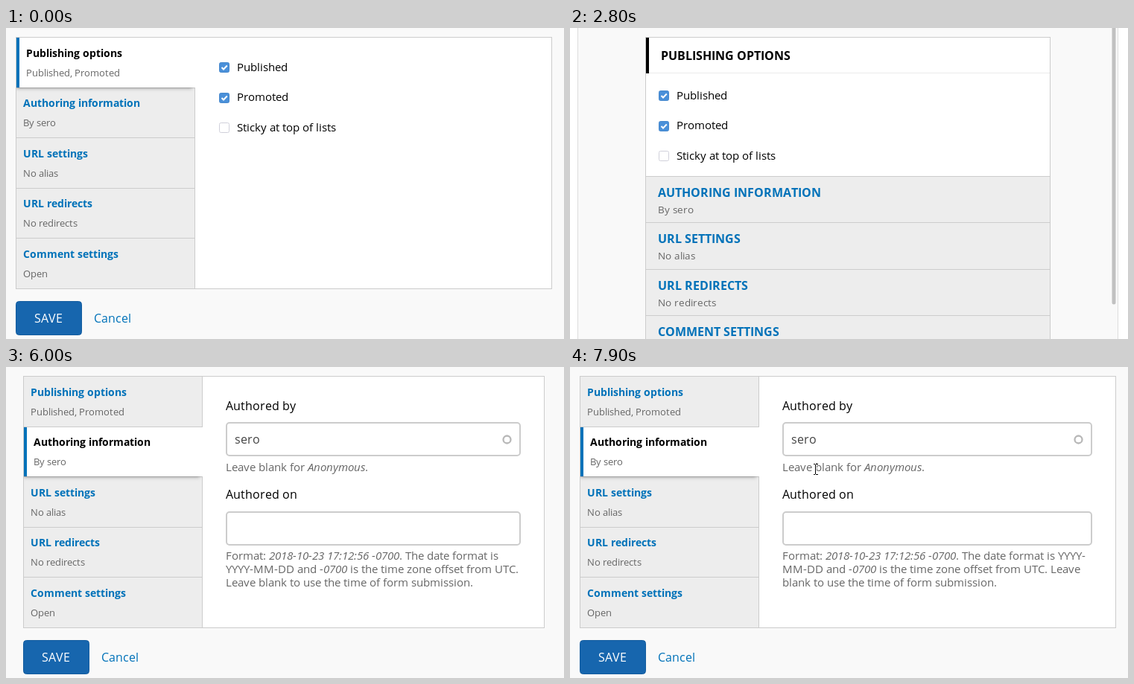
An HTML page with a canvas for the animation above (8000 ms loop, 749 by 418 pixels).

```html
<!DOCTYPE html>
<html lang="en">
<head>
<meta charset="utf-8">
<title>Responsive settings tabs</title>
<style>
html, body { margin: 0; width: 100%; height: 100%; overflow: hidden; background: #f9f9f9; }
canvas { display: block; }
</style>
</head>
<body>
<canvas id="stage" width="749" height="418"></canvas>
<script>
const W = 749, H = 418, LOOP = 8000;
const ctx = document.getElementById('stage').getContext('2d');

const BLUE = '#0072b9', LINE = '#ccc', TAB = '#ededed', PAGE = '#f9f9f9', MUTED = '#666';
const USER = 'sero';
const TABS = [
  ['Publishing options', 'Published, Promoted'],
  ['Authoring information', 'By ' + USER],
  ['URL settings', 'No alias'],
  ['URL redirects', 'No redirects'],
  ['Comment settings', 'Open']
];
const OPTIONS = ['Published', 'Promoted', 'Sticky at top of lists'];
const HELP_BY = 'Leave blank for *Anonymous*.';
const HELP_ON = 'Format: *2018-10-23 17:12:56 -0700*. The date format is YYYY-MM-DD and ' +
  '*-0700* is the time zone offset from UTC. Leave blank to use the time of form submission.';

// Window width over time: [ms, left, right] for the wide panel, [ms, edge] for the narrow window
const SIZES = [
  [0, 13, 733], [700, 12, 735], [900, 13, 733], [1100, 15, 731], [1200, 17, 729], [1300, 20, 726],
  [1400, 3], [1500, 5], [1600, 7], [1700, 9], [1800, 11], [2800, 10],
  [5700, 8], [5800, 6], [5900, 4],
  [6000, 23, 723], [6100, 22, 724], [6200, 21, 725], [6300, 18, 728], [6400, 15, 731],
  [6500, 12, 732], [6600, 13, 733]
];
const POINTER = [
  [0], [3200, hand, 591, 366], [3300, hand, 548, 337], [3400, hand, 503, 305],
  [3500, hand, 460, 274], [3600, hand, 430, 253], [3700, hand, 418, 245],
  [4000, arrow, 418, 245], [4400, arrow, 417, 244], [4600, arrow, 472, 286],
  [4700, arrow, 677, 404], [4800],
  [7600, arrow, 651, 404], [7700, arrow, 505, 272], [7800, arrow, 360, 160], [7900, beam, 330, 137]
];

const at = (keys, t) => keys.filter(k => k[0] <= t).pop();

function box(x, y, w, h, color) {
  ctx.fillStyle = color;
  ctx.fillRect(x, y, w, h);
}

function rounded(x, y, w, h, r, fill, stroke, lw = 1) {
  ctx.beginPath();
  ctx.roundRect(x + lw / 2, y + lw / 2, w - lw, h - lw, r);
  ctx.fillStyle = fill;
  ctx.fill();
  if (stroke) {
    ctx.strokeStyle = stroke;
    ctx.lineWidth = lw;
    ctx.stroke();
  }
}

// Text is set on whole pixels, with each advance rounded
const advances = new Map();
function advance(ch) {
  const key = ctx.font + ch;
  if (!advances.has(key)) advances.set(key, Math.round(ctx.measureText(ch).width));
  return advances.get(key);
}
const setFont = (size, style = '') => { ctx.font = `${style} ${size}px "Open Sans", sans-serif`; };
const measure = str => [...str].reduce((sum, ch) => sum + advance(ch), 0);

function glyphs(str, x, y) {
  for (const ch of str) {
    ctx.fillText(ch, x, y);
    x += advance(ch);
  }
  return x;
}

function text(str, x, y, size, color = '#000', style = '') {
  setFont(size, style);
  ctx.fillStyle = color;
  glyphs(str, x, y);
}

// Wrapped text; asterisks switch italics
function rich(str, left, y, width) {
  let x = left, italic = false;
  ctx.fillStyle = MUTED;
  for (const part of str.split(/(\*)|(?<= )|(?<=YYYY-|MM-)/).filter(Boolean)) {
    if (part === '*') {
      italic = !italic;
      continue;
    }
    setFont(15, italic ? 'italic' : '');
    if (x + measure(part.trimEnd()) > left + width) {
      x = left;
      y += 18.4;
    }
    x = glyphs(part, x, Math.floor(y));
  }
}

function checkbox(x, y, on) {
  rounded(x, y, 14, 14, 2, on ? '#4a90d9' : '#fff', on ? '#4688cd' : '#d0d0da');
  if (!on) return;
  ctx.strokeStyle = '#fff';
  ctx.lineWidth = 2;
  ctx.beginPath();
  ctx.moveTo(x + 3.5, y + 7);
  ctx.lineTo(x + 6, y + 9.5);
  ctx.lineTo(x + 10.8, y + 4.5);
  ctx.stroke();
}

function options(x, y) {
  OPTIONS.forEach((label, i) => {
    const top = y + Math.round(i * 40.5);
    checkbox(x, top, i < 2);
    text(label, x + 24, y + 12 + Math.floor(i * 40.5), 15);
  });
}

function authoring(x, y, width, gap) {
  text('Authored by', x, y, 16);
  rounded(x, y + 16, width, 46, 4, '#fff', LINE, 2);
  text(USER, x + 12, y + 45, 16, '#444');
  ctx.beginPath();
  ctx.arc(x + width - 18.5, y + 39.5, 5, 0, 7);
  ctx.strokeStyle = '#b8b8b8';
  ctx.lineWidth = 2.3;
  ctx.stroke();
  rich(HELP_BY, x, y + 82, width);
  text('Authored on', x, y + gap, 16);
  rounded(x, y + 136, width, 46, 4, '#fff', LINE, 2);
  rich(HELP_ON, x, y + gap + 82, width);
}

function wide(left, right, active) {
  box(0, 0, W, H, PAGE);
  box(left, 12, right - left, 339, LINE);
  box(left + 1, 13, right - left - 2, 337, '#fff');
  box(left + 1, 13, 239, 337, TAB);
  box(left + 240, 13, 1, 337, LINE);
  const edge = i => 12 + Math.floor(i * 67.6 + .4);
  for (let i = 1; i < 5; i++) box(left + 1, edge(i), 240, 1, LINE);

  const top = edge(active) + 1, bottom = edge(active + 1);
  ctx.save();
  ctx.beginPath();
  ctx.rect(left + 1, top, 240, bottom - top + 8);
  ctx.clip();
  ctx.shadowColor = 'rgba(0,0,0,.35)';
  ctx.shadowBlur = 5;
  ctx.shadowOffsetY = 1;
  box(left + 1, top + 6, 236, bottom - top - 6, '#fff');
  ctx.restore();
  box(left + 1, top, 240, bottom - top, '#fff');
  box(left + 1, top, 4, bottom - top, BLUE);

  TABS.forEach(([title, note], i) => {
    const on = i === active, y = Math.floor(i * 67.5);
    text(title, left + (on ? 14 : 10), 39 + y, 14, on ? '#000' : BLUE, 'bold');
    text(note, left + (on ? 14 : 10), 65 + y, 13, MUTED);
  });

  if (active) authoring(left + 272, 58, right - left - 304, 119);
  else options(left + 273, 46);

  rounded(left, 367, 89, 46, 4, '#1766ae', '#135c9f');
  text('SAVE', left + 25, 396, 16, '#fff');
  text('Cancel', left + 105, 396, 16, BLUE);
}

function row(left, y, [title, note], color = TAB) {
  box(left + 1, y + 1, 542, 62, color);
  box(left, y, 544, 1, LINE);
  text(title.toUpperCase(), left + 17, y + 28, 16, BLUE, 'bold');
  text(note, left + 17, y + 50, 13.536, MUTED);
}

function header(left, y, title, color) {
  box(left + 1, y, 542, 47, color);
  box(left + 1, y + 47, 542, 1, '#ebebeb');
  box(left + 1, y, 4, 48, '#000');
  text(title.toUpperCase(), left + 21, y + 30, 16, '#000', 'bold');
}

function narrow(edge, active, fading) {
  const left = Math.floor(96 + edge / 2), right = 746 - edge;
  box(0, 0, W, H, '#fff');
  box(edge, 0, right - edge, H, '#ddd');
  box(edge + 1, 0, right - edge - 2, H, PAGE);
  rounded(727, -10, 6, active ? 307 : 382, 3, '#c1c1c1');

  box(left, 12, 544, H, LINE);
  box(left + 1, 13, 542, H, '#fff');
  if (active) {
    row(left, 12, TABS[0], fading ? '#fafafa' : TAB);
    box(left, 75, 544, 1, LINE);
    header(left, 76, TABS[1][0], fading ? '#f0eef2' : '#fff');
    authoring(left + 17, 158, 510, 120);
    row(left, 416, TABS[2]);
  } else {
    header(left, 13, TABS[0][0], '#fff');
    options(left + 18, 84);
    for (let i = 1; i < 5; i++) row(left, 199 + Math.round((i - 1) * 62.4), TABS[i]);
  }
}

function shape(x, y, points) {
  ctx.beginPath();
  points.forEach(([px, py]) => ctx.lineTo(x + px, y + py));
  ctx.closePath();
  ctx.lineJoin = 'round';
  ctx.strokeStyle = '#fff';
  ctx.lineWidth = 2;
  ctx.stroke();
  ctx.fillStyle = '#000';
  ctx.fill();
}

function arrow(x, y) {
  shape(x, y, [[0, 0], [0, 14], [3.2, 11], [5.8, 16.8], [8, 15.8], [5.5, 10.2], [10, 10]]);
}

function hand(x, y) {
  shape(x, y, [[-1, 0], [1, 0], [1.5, 6], [4, 6], [7, 7], [10, 8.5], [10, 13], [8, 19],
    [-1, 19], [-5, 12], [-4, 10], [-1.5, 12]]);
}

function beam(x, y) {
  box(x - 2, y - 6, 3, 13, '#fff');
  box(x - 1, y - 6, 1, 13, '#000');
  for (const end of [y - 7, y + 7]) {
    box(x - 3, end, 2, 1, '#000');
    box(x, end, 3, 1, '#000');
  }
}

function draw(t) {
  const [, a, b] = at(SIZES, t);
  const active = t >= 4000 ? 1 : 0;
  if (b) wide(a, b, active);
  else narrow(a, active, t >= 4000 && t < 4100);
  const [, cursor, x, y] = at(POINTER, t);
  if (cursor) cursor(x, y);
}

const start = performance.now();
function tick() {
  draw((performance.now() - start) % LOOP);
  requestAnimationFrame(tick);
}
tick();
</script>
</body>
</html>
```
